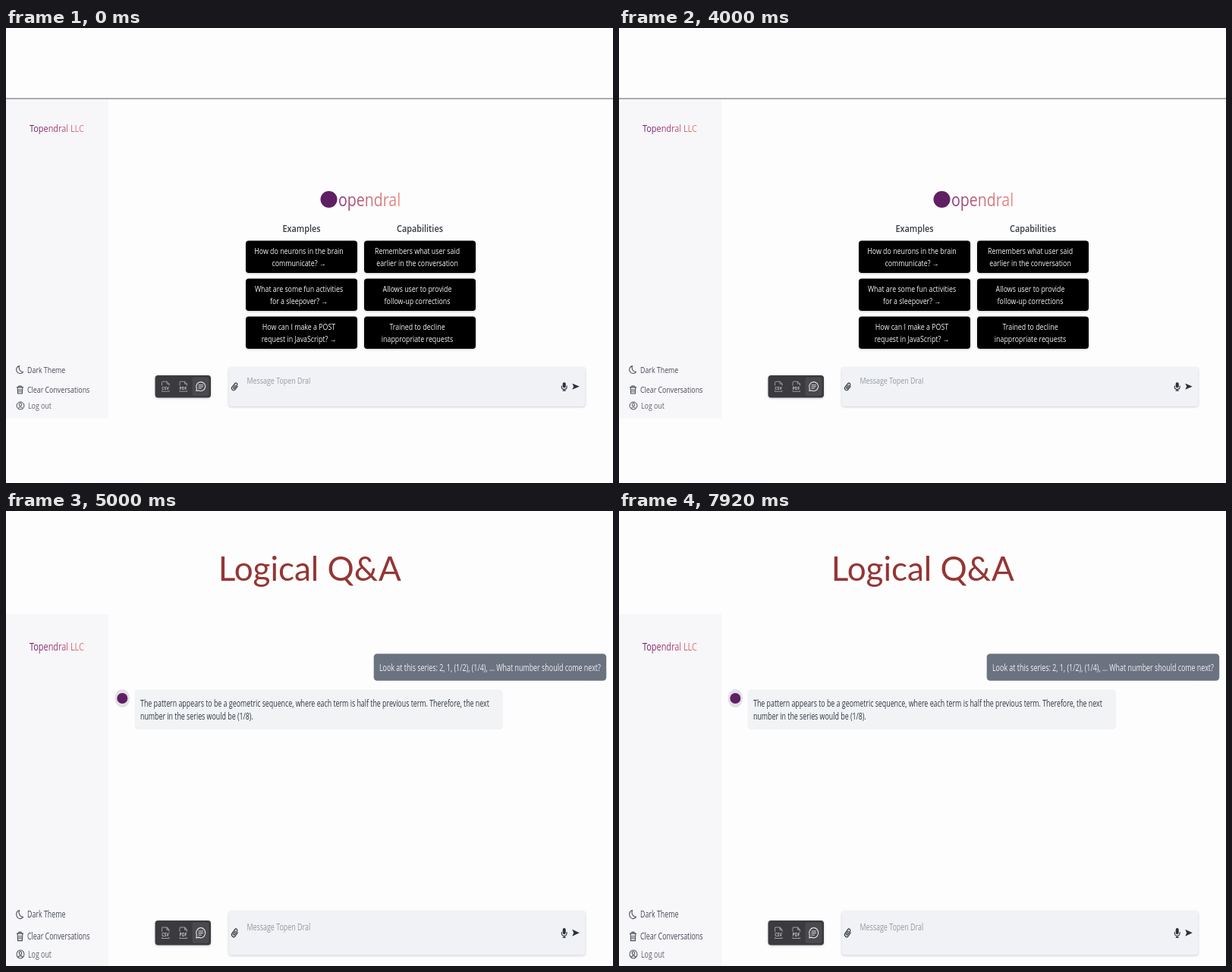
Animation of 800x600 px, one loop 8 s. Source, as an HTML page:

```html
<!DOCTYPE html>
<html lang="en">
<head>
<meta charset="utf-8">
<title>Chat demo</title>
<style>
  html, body { margin: 0; width: 100%; height: 100%; overflow: hidden; background: #fff; }
  svg { display: block; width: 100vw; height: 100vh; }
  text { font-family: "Open Sans", "Noto Sans", sans-serif; white-space: pre; }
  .title { font-family: Lato, sans-serif; }
  .shadow { filter: drop-shadow(0 1px 1.5px rgba(60, 60, 75, .25)); }
  .line { fill: none; stroke-linecap: round; stroke-linejoin: round; }
</style>
</head>
<body>
<svg viewBox="0 0 800 600" xmlns="http://www.w3.org/2000/svg">
  <defs>
    <linearGradient id="brand">
      <stop offset="0" stop-color="#6d1a6c"/>
      <stop offset=".5" stop-color="#a8407a"/>
      <stop offset="1" stop-color="#e8857b"/>
    </linearGradient>
    <linearGradient id="wordmark">
      <stop offset="0" stop-color="#893377"/>
      <stop offset=".5" stop-color="#cb6f7f"/>
      <stop offset="1" stop-color="#e98f80"/>
    </linearGradient>
  </defs>
  <g id="welcome"></g>
  <g id="answer"></g>
</svg>
<script>
const LOOP = 8000, CUT = 5000;
const NAME = "Topendral";
const INK = "#454c58", DARK = "#2b303a", MARK = "#5f1f63", PAGE = "#fefdfe";
const SQUEEZE = 0.67;

const rect = (x, y, w, h, fill, r = 0, extra = "") =>
  `<rect x="${x}" y="${y}" width="${w}" height="${h}" rx="${r}" fill="${fill}" ${extra}/>`;

const at = (x, y, k, body) => `<g transform="translate(${x} ${y}) scale(1 ${k})">${body}</g>`;

const path = (d, color, width = 1) =>
  `<path class="line" d="${d}" stroke="${color}" stroke-width="${width}"/>`;

// Returns a label maker for a screen with vertical scale ky.
const labels = ky => (x, y, str, fill, { size = 13.2, anchor = "start", weight = 400 } = {}) =>
  `<text transform="translate(${x} ${y}) scale(${SQUEEZE} ${ky})" font-size="${size}"
    font-weight="${weight}" text-anchor="${anchor}" fill="${fill}">${str}</text>`;

const fileIcon = kind =>
  path("M-4.5 -1.5V-5.5Q-4.5 -6.5 -3.5 -6.5H2L5 -3.5V-1.5M2 -6.5V-3.5H5M-4.5 5.5V6.5H5V5.5", "#a2a4a9", .9) +
  `<text y="4.2" font-size="5.6" font-weight="700" text-anchor="middle" fill="#c4c5c9"
    transform="scale(.92 1)">${kind}</text>`;

const icons = {
  moon: path("M-1.2 -4.9A5 5 0 1 0 3.9 3A5.6 5.6 0 0 1 -1.2 -4.9Z", INK, 1.1),
  trash: path("M-4 -3.4H4M-1.6 -3.6V-5H1.6V-3.6M-3.3 -3.2L-2.9 5H2.9L3.3 -3.2M-1.2 -1V3M1.2 -1V3", INK, 1.1),
  user: `<circle r="4.9" fill="none" stroke="${INK}"/>
    <circle cy="-1.4" r="1.8" fill="none" stroke="${INK}"/>` + path("M-3.1 3.5Q0 -.2 3.1 3.5", INK),
  chat: path("M-5.6 5.8L-5.2 2.4A5.9 5.9 0 1 1 -2.6 5.2Z", "#e6e6e8", 1.1) +
    path("M-2.6 -2H3M-2.6 .2H3M-2.6 2.4H1", "#e6e6e8", .9),
  clip: `<g transform="rotate(38)">` +
    path("M2.7 -2.4V2.8A2.6 2.6 0 0 1 -2.5 2.8V-3A1.8 1.8 0 0 1 1.1 -3V2.2A.9 .9 0 0 1 -.7 2.2V-2", DARK, 1.1) + `</g>`,
  mic: rect(-2, -5.6, 4, 7.4, DARK, 2) + path("M-3.4 -.6V.4A3.4 3.3 0 0 0 3.4 .4V-.6M0 3.8V5.4M-1.6 5.4H1.6", DARK, 1.1),
  send: `<path d="M-4.8 -4.1L4.8 0L-4.8 4.1L-2.8 0Z" fill="${DARK}"/>`
};

// Sidebar and message bar, shared by both screens.
function frame(s) {
  const label = labels(s.ky), k = s.ky / 0.8;
  const menu = [
    [18.7, 28, "moon", "Dark Theme", INK],
    [18.5, 28, "trash", "Clear Conversations", INK],
    [19, 29, "user", "Log out", "#5f6673"]
  ];
  const mid = s.tools.y + s.tools.h / 2;
  return rect(0, s.top, 800, s.bottom - s.top, PAGE) +
    rect(0, s.top, 135, s.bottom - s.top, "#f7f6f8") +
    label(31, s.brandY, NAME + " LLC", "url(#brand)", { size: 16.3 }) +
    menu.map(([ix, tx, icon, str, color], i) =>
      at(ix, s.menu[i], k, icons[icon]) + label(tx, s.menu[i] + 4, str, color)).join("") +
    rect(196.5, s.tools.y, 73.5, s.tools.h, "#3b3b3f", 4, 'class="shadow"') +
    rect(245.5, s.tools.y + 2.5, 22, s.tools.h - 5, "#4a4a4e", 3) +
    at(210, mid, k, fileIcon("CSV")) +
    at(233.5, mid, k, fileIcon("PDF")) +
    at(256.5, mid, k, icons.chat) +
    rect(293.5, s.bar.y, 470, s.bar.h, "#f0f2f5", 4, 'class="shadow"') +
    at(301.7, mid, k, icons.clip) +
    label(317.5, s.bar.y + s.hint, "Message Topen Dral", "#959aa3", { size: 13.3 }) +
    at(735.7, mid, k, icons.mic) +
    at(751, mid, k, icons.send);
}

function welcome() {
  const label = labels(0.8), mid = { anchor: "middle" };
  const columns = [
    { x: 316, head: "Examples", items: [
      ["How do neurons in the brain", "communicate? →"],
      ["What are some fun activities", "for a sleepover? →"],
      ["How can I make a POST", "request in JavaScript? →"]] },
    { x: 472, head: "Capabilities", items: [
      ["Remembers what user said", "earlier in the conversation"],
      ["Allows user to provide", "follow-up corrections"],
      ["Trained to decline", "inappropriate requests"]] }
  ];
  const card = (x, y, lines) =>
    rect(x, y, 147, 42.5, "#000", 4, 'class="shadow"') +
    lines.map((str, i) => label(x + 70, y + 17.3 + i * 16, str, "#f4f4f5", mid)).join("");
  return rect(0, 0, 800, 600, PAGE) +
    frame({ ky: 0.8, top: 94, bottom: 514.5, brandY: 136.5, menu: [450.5, 477, 498],
            tools: { y: 458, h: 29.5 }, bar: { y: 447, h: 52 }, hint: 22 }) +
    rect(0, 92.5, 800, 1.2, "#77767a") +
    `<circle cx="425.5" cy="226" r="11" fill="${MARK}"/>` +
    label(438, 235, NAME.slice(1), "url(#wordmark)", { size: 29.2 }) +
    columns.map(({ x, head, items }) =>
      label(x + 73.5, 269, head, "#343a46", { size: 16.2, weight: 600, anchor: "middle" }) +
      items.map((lines, i) => card(x, 280.5 + i * 50, lines)).join("")).join("");
}

function answer() {
  const label = labels(0.9);
  return rect(0, 0, 800, 600, PAGE) +
    `<text class="title" x="400.3" y="91.5" font-size="44" text-anchor="middle" fill="#943634">Logical Q&amp;A</text>` +
    frame({ ky: 0.9, top: 136, bottom: 600, brandY: 184, menu: [532, 561, 584.5],
            tools: { y: 540, h: 32.5 }, bar: { y: 527.5, h: 58 }, hint: 25 }) +
    rect(484.7, 188.2, 306.5, 35.5, "#6b7280", 4.5) +
    label(492, 210.7, "Look at this series: 2, 1, (1/2), (1/4), ... What number should come next?", "#f0f1f4", { size: 13.3 }) +
    `<ellipse cx="153.3" cy="247" rx="9.8" ry="12" fill="#e3dfe6"/>
     <circle cx="153.3" cy="247" r="7" fill="${MARK}"/>` +
    rect(169.5, 235.5, 485.5, 52.5, "#f1f3f5", 4.5) +
    label(177, 257.5, "The pattern appears to be a geometric sequence, where each term is half the previous term. Therefore, the next", "#2f3642") +
    label(177, 275.3, "number in the series would be (1/8).", "#2f3642");
}

const screens = { welcome: document.getElementById("welcome"), answer: document.getElementById("answer") };
screens.welcome.innerHTML = welcome();
screens.answer.innerHTML = answer();

function draw(t) {
  screens.welcome.style.display = t < CUT ? "" : "none";
  screens.answer.style.display = t < CUT ? "none" : "";
}

const start = performance.now();
function tick() {
  draw((performance.now() - start) % LOOP);
  requestAnimationFrame(tick);
}
tick();
</script>
</body>
</html>
```
